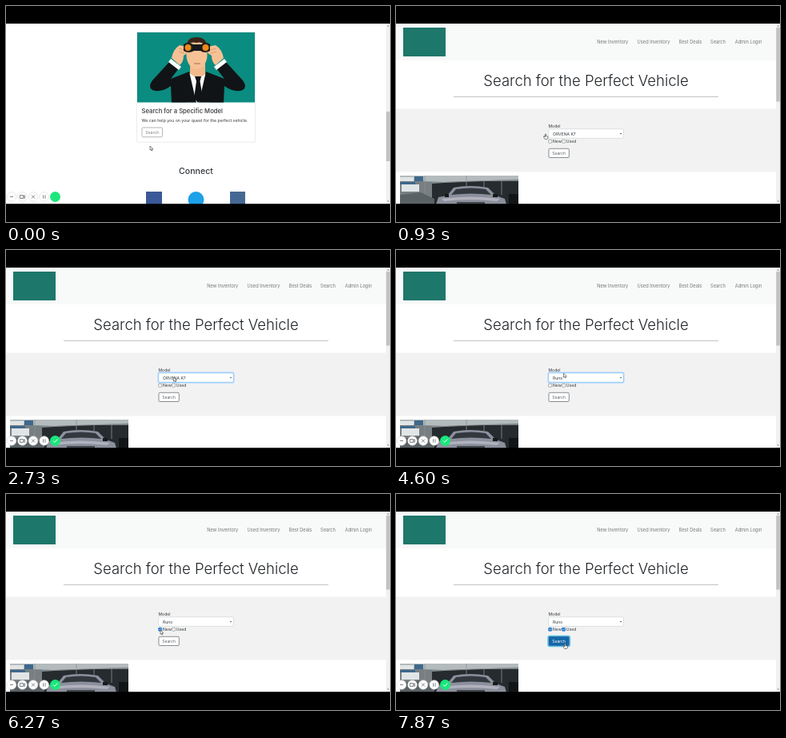
Animation of 480 by 270 pixels, one loop 8000 ms. Source, as an HTML page:

```html
<!DOCTYPE html>
<html lang="en">
<head>
<meta charset="utf-8">
<style>
html, body { margin: 0; width: 100%; height: 100%; overflow: hidden; background: #000; }
svg { display: block; width: 100vw; height: 100vh; }
text { font-family: Inter, "Open Sans", sans-serif; font-size: 5.1px; fill: #33373b; }
.mid { text-anchor: middle; }
.nav text { font-size: 5.7px; fill: #74777a; text-anchor: middle; }
</style>
</head>
<body>
<svg viewBox="0 0 480 270">
  <defs>
    <clipPath id="photoClip"><path d="M5 212H153V248H5z"/></clipPath>
    <clipPath id="artClip"><path d="M164 33H311V120.500H164z"/></clipPath>
  </defs>
  <path fill="#fff" d="M0 22H480V248H0z"/>

  <g id="home">
    <rect x="163.500" y="32.700" width="148" height="137.500" rx="1.500" fill="#fff" stroke="#dfdfdf" stroke-width=".6"/>
    <g clip-path="url(#artClip)">
      <path fill="#0b8c80" d="M164 33H311V121H164z"/>
      <path fill="#f3b98b" d="M230 68H249V88L240 94L230 88z"/>
      <ellipse cx="238.500" cy="61" rx="13" ry="18" fill="#f6c195"/>
      <path fill="#3b2417" d="M226 50Q226 39 238 39Q251 39 251 51Q245 44 238 46Q231 44 226 50z"/>
      <path fill="#fff" d="M229 84L240 91L251 84L255 121H225z"/>
      <path fill="#111416" d="M236 88H244L242.500 94L246 115L240 121L235 115L238 94z"/>
      <g id="arm">
        <path fill="#111416" d="M205 69L216 78L206 91L229 82L238 121H207L206 100Q193 109 183 105Q177 101 183 93z"/>
        <path fill="#fff" d="M206 66L219 76L216 80L203 70z"/>
        <path fill="#f6c195" d="M207 65Q209 54 217 49L227 51L228 58L222 62Q222 70 217 74z"/>
        <path fill="none" stroke="#cf8e62" stroke-width=".7" d="M216 53L224 55M216 57L223 59"/>
      </g>
      <use href="#arm" transform="matrix(-1 0 0 1 479 0)"/>
      <path fill="#15181a" d="M222 48Q227 44 234 48H244Q250 44 255 48V56Q249 60 243 56H235Q228 60 222 56z"/>
      <g fill="#ee8b19" stroke="#252525" stroke-width="1">
        <circle cx="227.500" cy="52" r="4.500"/><circle cx="249.500" cy="52" r="4.500"/>
      </g>
      <path fill="none" stroke="#9e5740" stroke-width=".8" d="M235 72H243"/>
    </g>
    <text x="169.500" y="134" style="font-size:7.700px;font-weight:500">Search for a Specific Model</text>
    <text x="169.500" y="145" style="font-size:5.200px">We can help you on your quest for the perfect vehicle.</text>
    <rect id="homeButton" x="170" y="152" width="25.500" height="11.700" rx="1.200" stroke="#92979b" stroke-width=".7"/>
    <text id="homeLabel" class="mid" x="182.700" y="159.700">Search</text>
    <text class="mid" x="237.500" y="210" style="font-size:10.600px;font-weight:500">Connect</text>
    <path fill="#3b5998" d="M175 232H195V250H175z"/>
    <circle cx="237.500" cy="242" r="10" fill="#1da1e8"/>
    <path fill="#466994" d="M280 232H299V250H280z"/>
  </g>

  <g id="finder">
    <path fill="#f8f9f9" d="M0 22H475V68H0z"/>
    <path fill="#1d776b" d="M9 27H62V63H9z"/>
    <g class="nav">
      <text x="270.800" y="46.500">New Inventory</text>
      <text x="322" y="46.500">Used Inventory</text>
      <text x="368" y="46.500">Best Deals</text>
      <text x="402.500" y="46.500">Search</text>
      <text x="440.500" y="46.500">Admin Login</text>
    </g>
    <text class="mid" x="237.500" y="100" style="font-size:18.500px;font-weight:300;fill:#212529">Search for the Perfect Vehicle</text>
    <path stroke="#aaa" stroke-width=".7" d="M72 113.500H403"/>
    <path fill="#f2f2f2" d="M0 128.500H475V207.500H0z"/>
    <text x="190.500" y="151.500">Model</text>
    <rect id="ring" x="190" y="153" width="95" height="13" rx="1.500" fill="none" stroke="#b9dcff" stroke-width="1.300"/>
    <rect id="select" x="190.700" y="153.700" width="93.600" height="11.600" rx="1.200" fill="#fff" stroke-width=".7"/>
    <text id="model" x="196" y="161.500" fill="#495057"></text>
    <path d="M280 159l1 1.200l1-1.200" fill="none" stroke="#333" stroke-width=".7"/>
    <g id="newBox"></g>
    <text x="196" y="171.300">New</text>
    <g id="usedBox"></g>
    <text x="212.800" y="171.300">Used</text>
    <rect id="halo" x="190" y="177.400" width="27.400" height="13" rx="1.800" fill="none" stroke="#62c8e6" stroke-width="1.500"/>
    <rect id="findButton" x="191" y="178.300" width="25.300" height="11.200" rx="1.200" stroke-width=".7"/>
    <text id="findLabel" class="mid" x="203.600" y="185.700">Search</text>
    <g clip-path="url(#photoClip)">
      <path fill="#777f82" d="M5 212H153V248H5z"/>
      <path fill="#b4bbbc" d="M5 212H153V217L60 220L5 218z"/>
      <path fill="#252b2e" d="M45 222L90 219H153V248H45z"/>
      <path fill="#e1e5e6" d="M5 214H22V219H5zM7 223H29V232H7z"/>
      <path fill="#3e688b" d="M23 213H34V219H23zM5 220H24V223H5z"/>
      <path stroke="#8b9395" stroke-width=".8" d="M36 212V248M88 212V228M45 221L153 217M110 218V229M132 218V236"/>
      <path fill="#8c909d" d="M50 248L53 239L64 237L72 227Q92 223 115 227L125 237L136 241L138 248z"/>
      <path fill="#31393f" d="M69 236L75 229Q94 226 112 229L119 236Q94 233 69 236z"/>
      <path fill="#b0b3bd" d="M57 241Q92 236 130 241L126 244Q92 240 60 244z"/>
      <path fill="#42474c" d="M76 245H111V248H76z"/>
      <path fill="#17191b" d="M61 235h5v4h-5zM121 235h6v4h-6z"/>
      <path fill="#5a6266" d="M5 236L31 233L48 241V248H5z"/>
      <path fill="#111517" d="M141 235H153V248H141z"/>
    </g>
  </g>

  <path fill="#f1f1f1" d="M475 22H480V248H475z"/>
  <rect id="thumb" x="475.300" width="4.400" fill="#c1c1c1"/>
  <path fill="#777" d="M476.500 25.500l1.200-1.500l1.200 1.500zM476.500 243.500l1.200 1.500l1.200-1.500z"/>

  <g id="tools">
    <g fill="#fff" stroke="#d8d8d8" stroke-width=".6">
      <circle cx="7" cy="238.500" r="5.800"/><circle cx="20.500" cy="238.500" r="5.800"/>
      <circle cx="34" cy="238.500" r="5.800"/><circle cx="47.700" cy="238.500" r="5.800"/>
    </g>
    <g fill="none" stroke="#74797c" stroke-width=".9">
      <path d="M5 238.500H9M32 236.500l4 4M36 236.500l-4 4M46.600 236.300v4.400M49 236.300v4.400"/>
      <path d="M17.500 236.500h4v4h-4zM21.500 238l2-1.200v3.600l-2-1.200"/>
    </g>
    <circle cx="61.500" cy="238.500" r="6.500" fill="#1be77c"/>
    <path id="tick" d="M59 238.500l1.800 1.800l3.500-3.700" fill="none" stroke="#fff" stroke-width="1"/>
  </g>

  <g id="pointer" fill="#fff" stroke="#333" stroke-width=".6" stroke-linejoin="round">
    <path id="arrow" d="M0 0V5.200L1.200 4.200L2 6L3 5.500L2.200 3.900H3.800z"/>
    <path id="hand" d="M-.6 .2Q0-.5 .6 .2V2.500L2.800 3V5Q2.500 6.500 1.500 6.500H-.7L-2.400 4Q-2-.0-.6 4z"/>
  </g>
  <path d="M0 0H480V22H0zM0 247.300H480V270H0z"/>
</svg>
<script>
const LOOP = 8000;
const PAGE_CHANGE = 930;
const el = id => document.getElementById(id);
const show = (id, on) => el(id).setAttribute('visibility', on ? 'inherit' : 'hidden');
const set = (id, attrs) => Object.entries(attrs).forEach(([k, v]) => el(id).setAttribute(k, v));
const between = (t, a, b) => t >= a && t < b;

// Pointer tip: time, x, y
const path = [
  [0, 180, 175], [70, 180, 175], [400, 182, 158], [930, 187, 160],
  [1130, 187, 160], [1730, 209.5, 159], [2730, 209.5, 159],
  [3000, 221, 169], [3330, 209.5, 154], [4800, 209.5, 154],
  [5530, 193, 170], [6270, 193, 170], [6730, 209, 169.5],
  [7130, 209, 169.5], [7600, 211.5, 187], [8000, 211.5, 187]
];

function pointerAt(t) {
  const i = path.findIndex(p => p[0] > t);
  const [t0, x0, y0] = path[i - 1], [t1, x1, y1] = path[i];
  if (t1 === PAGE_CHANGE) return [x0, y0];
  const u = (t - t0) / (t1 - t0), k = u * u * (3 - 2 * u);
  return [x0 + (x1 - x0) * k, y0 + (y1 - y0) * k];
}

for (const [id, x] of [['newBox', 190.7], ['usedBox', 207.6]]) {
  el(id).innerHTML = `<rect x="${x}" y="167.200" width="4" height="4" rx=".6" stroke-width=".6"/>
    <path d="M${x + .8} 169.200l1 1l1.600-1.900" fill="none" stroke="#fff" stroke-width=".7"/>`;
}

function check(id, on) {
  const [box, mark] = el(id).children;
  box.setAttribute('fill', on ? '#1672c9' : '#fff');
  box.setAttribute('stroke', on ? '#1672c9' : '#777');
  mark.setAttribute('visibility', on ? 'inherit' : 'hidden');
}

function button(name, active, fill, idle, line) {
  set(name + 'Button', { fill: active ? fill : '#fff', stroke: active ? fill : line });
  el(name + 'Label').style.fill = active ? '#fff' : idle;
}

function draw(t) {
  const home = t < PAGE_CHANGE;
  show('home', home);
  show('finder', !home);
  set('thumb', home ? { y: 132, height: 62 } : { y: 27, height: 92.5 });

  show('tools', home || t >= 1270);
  show('tick', t >= 330);

  const focused = between(t, 1930, 5800);
  show('ring', !home && focused);
  set('select', { stroke: focused ? '#78b8ee' : '#ced4da' });
  el('model').textContent = t < 4600 ? 'ORVENA K7' : 'Runo';
  check('newBox', !home && t >= 5870);
  check('usedBox', !home && t >= 7130);
  if (home) ['newBox', 'usedBox'].forEach(id => el(id).children[1].setAttribute('visibility', 'hidden'));

  button('home', between(t, 600, PAGE_CHANGE), '#6c757d', '#777c80', '#92979b');
  button('find', t >= 7800, '#1667a8', '#5b6064', '#596168');
  show('halo', !home && t >= 7800);

  const [x, y] = pointerAt(t);
  const hand = between(t, 330, 1400) || t >= 7470;
  set('pointer', { transform: `translate(${x} ${y})` });
  show('arrow', !hand);
  show('hand', hand);
}

const start = performance.now();
function tick() {
  draw((performance.now() - start) % LOOP);
  requestAnimationFrame(tick);
}
tick();
</script>
</body>
</html>
```
